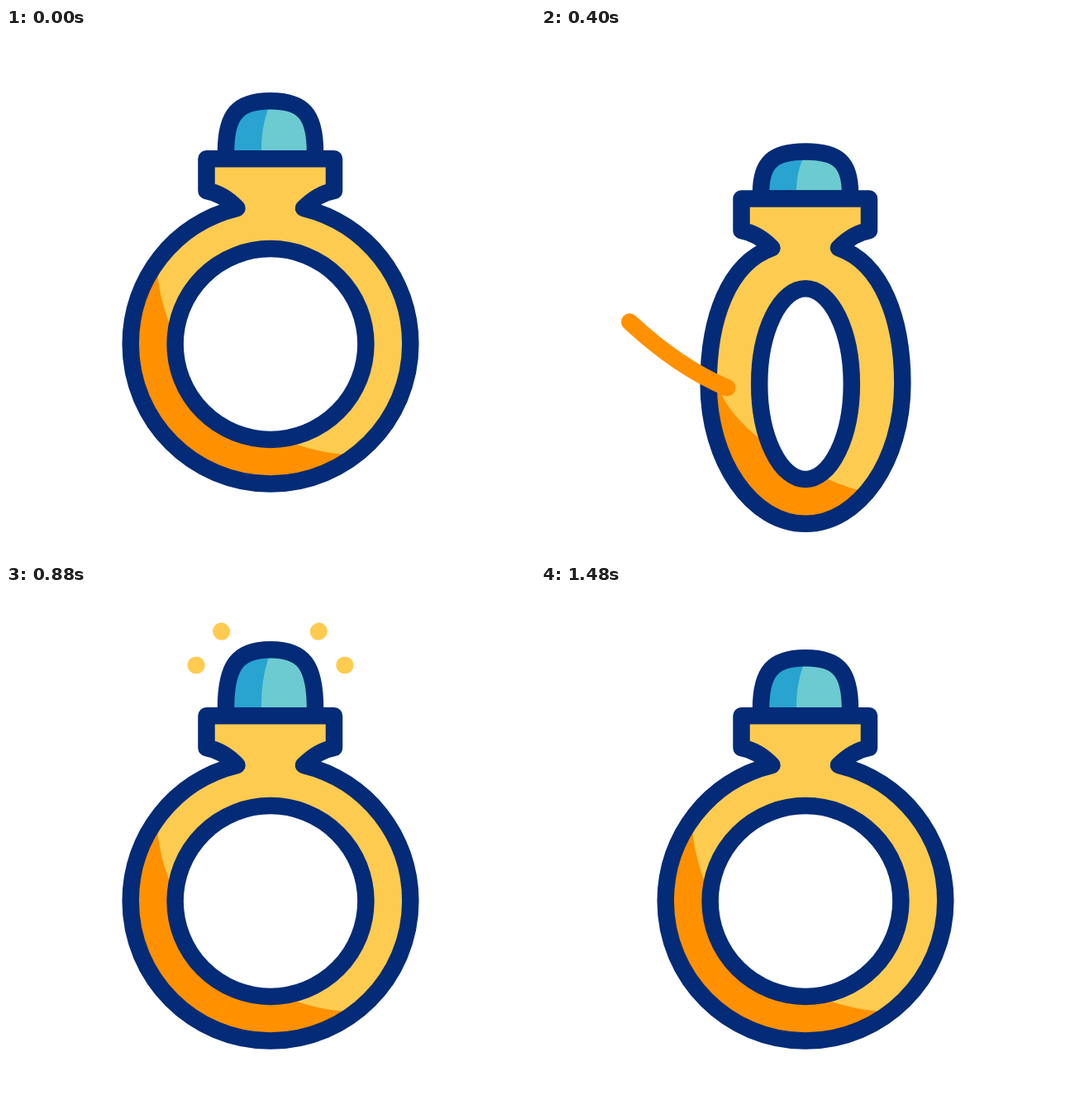
An HTML page with a canvas for the animation above (1.52 s loop, 640 px wide and 640 px high).

```html
<!DOCTYPE html>
<html lang="en">
<head>
<meta charset="utf-8">
<title>Ring</title>
<style>
  html, body { margin: 0; height: 100%; overflow: hidden; background: #fff; }
  canvas { display: block; width: 100vmin; height: 100vmin; }
</style>
</head>
<body>
<canvas width="640" height="640"></canvas>
<script>
const ctx = document.querySelector('canvas').getContext('2d');
const LOOP = 1520;
const NAVY = '#032b77', GOLD = '#fdcb50', ORANGE = '#ff9100', BLUE = '#29a3d0', TEAL = '#6bcbd0';

// Edge of the band's shadow: round band and squeezed band
const SHADE_ROUND = [183, 260, 183, 297, 196, 415, 292, 506, 410, 516, 470, 520];
const SHADE_THIN = [190, 354, 218, 394, 238, 440, 318, 493, 385, 511, 440, 527];

// Inner end, outer end
const SPARKS = [[230.5, 97, 201, 97], [261, 56.5, 240, 35], [378, 56.5, 400, 35], [409.5, 97, 438.5, 97]];

const linear = (t, a, b) => Math.min(1, Math.max(0, (t - a) / (b - a)));
const mix = (a, b, u) => a + (b - a) * u;
function ease(t, a, b) {
  const u = linear(t, a, b);
  return u * u * (3 - 2 * u);
}

function stroke(path, color) {
  ctx.strokeStyle = color;
  ctx.stroke(path);
}

function fill(path, color) {
  ctx.fillStyle = color;
  ctx.fill(path);
}

function gemPath(height) {
  const y = v => 158.3 - (158.3 - v) * height / 70;
  return {
    dome: new Path2D(`M266 158.3V${y(150)}C266 ${y(105)} 280 ${y(88.3)} 320 ${y(88.3)}
      S374 ${y(105)} 374 ${y(150)}V158.3Z`),
    facet: new Path2D(`M309 160V${y(148)}Q308.5 ${y(122)} 317 ${y(98)}L321 ${y(84)}H250V160Z`)
  };
}

function bodyPath(rx) {
  const r = rx / 169.3, left = 320 - rx, right = 320 + rx, k = rx * 0.552;
  return new Path2D(`M242.5 158.3V197Q262 200 279.5 218
    C${279.5 - 76 * r} 236.5 ${left} 304 ${left} 382.3
    C${left} 475.8 ${320 - k} 551.6 320 551.6
    S${right} 475.8 ${right} 382.3
    C${right} 304 ${360 + 76 * r} 236.5 360 218
    Q378 200 397 197V158.3Z`);
}

function shadePath(amount) {
  const p = SHADE_ROUND.map((v, i) => mix(v, SHADE_THIN[i], amount));
  return new Path2D(`M${p[0]} ${p[1]}L${p[2]} ${p[3]}C${p.slice(4, 10)}L${p[10]} ${p[11]}
    V600H100V${p[1]}Z`);
}

// A stretch of the parabola that sweeps across the band
function drawSweep(t) {
  const head = 1 - (1 - linear(t, 372, 654)) ** 3;
  const tail = linear(t, 346, 628) ** 3;
  if (head <= tail) return;
  const a = mix(-218, 218, tail), b = mix(-218, 218, head);
  const y = (p, q) => 407.5 - 0.00217 * p * q;
  stroke(new Path2D(`M${322 + a} ${y(a, a)}Q${322 + (a + b) / 2} ${y(a, b)} ${322 + b} ${y(b, b)}`), ORANGE);
}

function drawSparks(t) {
  const head = ease(t, 860, 1060), tail = ease(t, 1120, 1320);
  if (head <= tail) return;
  for (const [x0, y0, x1, y1] of SPARKS) {
    stroke(new Path2D(`M${mix(x0, x1, tail)} ${mix(y0, y1, tail)}L${mix(x0, x1, head)} ${mix(y0, y1, head)}`), GOLD);
  }
}

function draw(t) {
  const drop = 51 * (ease(t, 110, 450) - ease(t, 526, 871));
  const squeeze = 1.1 * (ease(t, 160, 455) - ease(t, 455, 790));
  const gemHeight = 70 - 16 * ease(t, 160, 490) + 26 * ease(t, 560, 890) - 10 * ease(t, 1120, 1460);

  ctx.fillStyle = '#fff';
  ctx.fillRect(0, 0, 640, 640);
  ctx.save();
  ctx.translate(0, drop);
  ctx.lineWidth = 20.5;
  ctx.lineCap = ctx.lineJoin = 'round';

  const { dome, facet } = gemPath(gemHeight);
  fill(dome, TEAL);
  ctx.save();
  ctx.clip(dome);
  fill(facet, BLUE);
  ctx.restore();
  stroke(dome, NAVY);

  const body = bodyPath(169.3 - 51.8 * squeeze);
  fill(body, GOLD);
  ctx.save();
  ctx.clip(body);
  fill(shadePath(squeeze), ORANGE);
  ctx.restore();
  stroke(body, NAVY);

  const hole = new Path2D();
  hole.ellipse(320, 382.5, 115.4 - 59.4 * squeeze, 115.4, 0, 0, 2 * Math.PI);
  fill(hole, '#fff');
  stroke(hole, NAVY);

  drawSweep(t);
  drawSparks(t);
  ctx.restore();
}

const start = performance.now();
function frame() {
  draw((performance.now() - start) % LOOP);
  requestAnimationFrame(frame);
}
frame();
</script>
</body>
</html>
```
